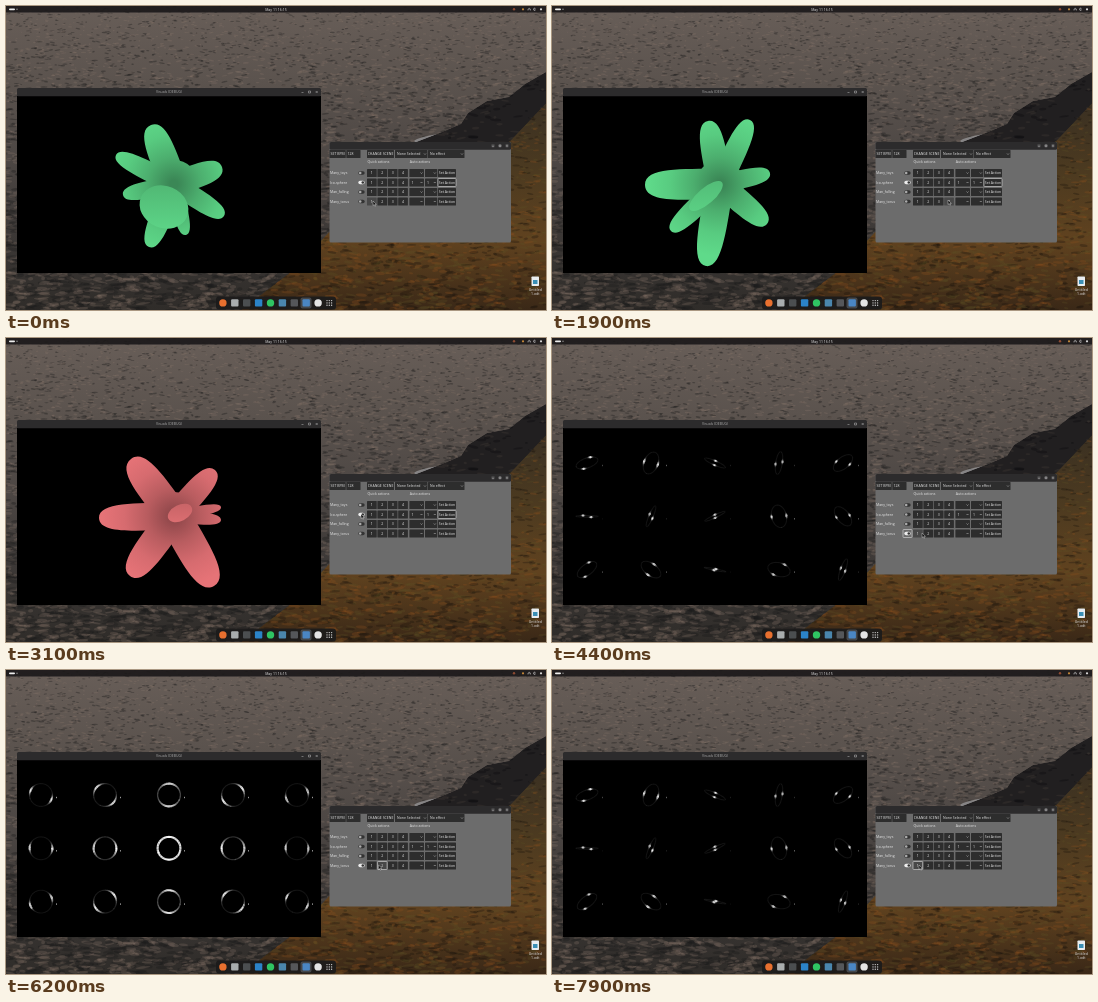
An HTML page with a canvas that plays this animation: 540x304 px, repeating every 8000 ms.

```html
<!DOCTYPE html>
<html lang="en">
<head>
<meta charset="utf-8">
<title>Desktop visuals</title>
<style>
html, body { margin: 0; width: 100%; height: 100%; overflow: hidden; background: #000; }
canvas, svg { position: absolute; left: 0; top: 0; }
#view { left: 11px; top: 90px; }
text { font-family: "Open Sans", "Noto Sans", sans-serif; font-size: 3.5px; fill: #e8e8e8; }
</style>
</head>
<body>
<canvas id="wall" width="540" height="304"></canvas>
<canvas id="view" width="304" height="177"></canvas>
<svg id="ui" width="540" height="304" viewBox="0 0 540 304"></svg>
<script>
const wall = document.getElementById('wall').getContext('2d');
const view = document.getElementById('view').getContext('2d');
const ui = document.getElementById('ui');
const TAU = Math.PI * 2;
const mix = (a, b, k) => a + (b - a) * k;
const smooth = v => { v = Math.max(0, Math.min(1, v)); return v * v * (3 - 2 * v); };
let seed = 7;
const rnd = (lo = 0, hi = 1) => lo + (hi - lo) * ((seed = seed * 16807 % 2147483647) / 2147483647);

// ---- Wallpaper: sea, cliff and heath in soft tones ----
function fade(y0, y1, ...stops) {
  const g = wall.createLinearGradient(0, y0, 0, y1);
  stops.forEach((c, i) => g.addColorStop(i / (stops.length - 1), c));
  return g;
}
function outline(pts) {
  const p = new Path2D();
  pts.forEach(q => p.lineTo(...q));
  p.closePath();
  return p;
}
function speck(x, y, rx, ry, turn, fill) {
  wall.fillStyle = fill;
  wall.beginPath();
  wall.ellipse(x, y, rx, ry, turn, 0, TAU);
  wall.fill();
}
// fills an outline, then scatters specks inside it
function textured(path, fill, count, top, size, tints) {
  wall.save();
  wall.clip(path);
  wall.fillStyle = fill;
  wall.fill(path);
  for (let i = 0; i < count; i++) {
    const y = rnd(top, 304), s = size * (0.5 + y / 250);
    speck(rnd(0, 540), y, s * rnd(0.8, 3), s * rnd(0.4, 0.8), rnd(-0.25, 0.25), tints[i % tints.length]);
  }
  wall.restore();
}
function paintWall() {
  const sea = outline([[0, 0], [540, 0], [540, 304], [0, 304]]);
  const cliff = outline([[540, 66], [519, 78], [503, 91], [481, 95], [462, 107], [455, 118], [436, 126], [405, 138], [540, 138]]);
  const heath = outline([[540, 97], [505, 134], [430, 190], [323, 226], [290, 262], [235, 304], [540, 304]]);
  textured(sea, fade(0, 304, '#685e58', '#5b534e', '#4d4744', '#3c3836', '#2f2c29'), 9000, 0, 1.5,
    ['rgba(28,27,29,.36)', 'rgba(146,126,112,.24)']);
  speck(424, 132, 16, 2.5, -0.2, 'rgba(170,172,175,.6)');
  textured(cliff, '#211f20', 1500, 60, 2, ['rgba(75,67,63,.25)', 'rgba(10,10,12,.35)']);
  textured(heath, fade(97, 304, '#3a3022', '#4c3a20', '#60421f', '#3a2817'), 4500, 95, 1.3,
    ['rgba(142,80,30,.28)', 'rgba(24,19,13,.3)', 'rgba(92,80,38,.25)']);
}

// ---- Interface ----
function add(tag, attrs, text) {
  const e = document.createElementNS('http://www.w3.org/2000/svg', tag);
  set(e, attrs);
  if (text) e.textContent = text;
  ui.append(e);
  return e;
}
function set(e, attrs) { for (const k in attrs) e.setAttribute(k, attrs[k]); }
const box = (x, y, width, height, fill, rx = 0) => add('rect', { x, y, width, height, fill, rx });
const dot = (cx, cy, r, fill) => add('circle', { cx, cy, r, fill });
const label = (x, y, s, anchor = 'start') => add('text', { x, y: y + 1.25, 'text-anchor': anchor }, s);
const stroke = (d, color) => add('path', { d, stroke: color, 'stroke-width': 0.5, fill: 'none' });
const DARK = '#2d2d2d', HOVER = '#484848';
const rowY = r => 167 + r * 9.5;
const buttonX = i => 361 + i * 10.4;
const toggles = [], torusButtons = [];
let focus, cursor;

function button(x, y, w, s) {
  const b = box(x, y - 4, w, 8, DARK, 0.6);
  if (s) label(x + w / 2, y, s, 'middle');
  return b;
}
function dropdown(x, y, w, s) {
  button(x, y, w);
  if (s) label(x + 2, y, s);
  stroke(`M${x + w - 3.5} ${y - 0.5}l1 1 1-1`, '#ccc');
}

function topBar() {
  box(0, 0, 540, 6.5, 'rgba(24,22,23,.88)');
  box(3, 2.4, 6, 1.8, '#eee', 0.9);
  dot(11, 3.3, 0.7, '#999');
  label(270, 3.3, 'May 11  16:15', 'middle');
  dot(508, 3.3, 1.2, '#8d4a32');
  dot(517, 3.3, 1.1, '#c88a3a');
  stroke('M522 4.5v-1.5h2.4v1.5M523.2 3v-1.2M527.5 2.7l1.5-.8v2.8l-1.5-.8z', '#ddd');
  dot(535, 3.3, 1.1, '#ddd');
}

function visualsWindow() {
  box(11, 82, 304, 8.2, '#2c2b2c', 1.5);
  label(163, 86, 'Visuals (DEBUG)', 'middle').style.fill = '#aaa';
  stroke('M295.5 86.5h2M302.5 85h2v2h-2zM309.7 85l2 2m0-2l-2 2', '#bbb');
}

function controlWindow() {
  box(323.5, 136, 181.5, 100.5, '#6c6c6c', 1.5);
  box(323.5, 136, 181.5, 7.8, '#2c2b2c', 1.5);
  for (let i = 0; i < 3; i++) dot(487 + i * 7, 139.8, 2, '#454445');
  stroke('M486 140.2h2M493.2 139h1.6v1.6h-1.6zM500.2 139l1.6 1.6m0-1.6l-1.6 1.6', '#ccc');
  button(323.5, 148, 16.3, 'SET BPM');
  button(340.3, 148, 14.2);
  label(341.5, 148, '128');
  button(361, 148, 27, 'CHANGE SCENE');
  dropdown(389, 148, 32.5, 'None Selected');
  dropdown(422, 148, 36.5, 'No effect');
  label(372.5, 156, 'Quick actions', 'middle');
  label(414, 156, 'Auto actions', 'middle');
  ['Many_toys', 'Ico-sphere', 'Man_falling', 'Many_torus'].forEach((name, r) => {
    const y = rowY(r), value = name === 'Ico-sphere' ? '1' : '';
    label(324, y, name);
    toggles.push([box(352.3, y - 1.8, 6.4, 3.6, '', 1.8), dot(0, y, 1.3)]);
    const quick = [0, 1, 2, 3].map(i => button(buttonX(i), y, 9.7, String(i + 1)));
    if (name === 'Many_torus') torusButtons.push(...quick);
    dropdown(403.4, y, 14.6, value);
    dropdown(419, y, 12.3, value);
    button(432, y, 18, 'Set Action');
  });
  focus = add('rect', { fill: 'none', stroke: '#ddd', 'stroke-width': 0.6, rx: 0.8, height: 8 });
}

function dock() {
  box(210, 290.5, 120, 13, 'rgba(28,27,27,.94)', 3);
  box(294.5, 291.5, 11, 11, '#45474a', 2);
  ['#e8702f', '#a9adae', '#4b4e50', '#2b83c8', '#2fc463', '#4a86ad', '#55575a', '#4a86c4', '#e4e4e4'].forEach((fill, i) =>
    box(213.2 + i * 11.9, 293.2, 7.4, 7.4, fill, i % 4 ? 1 : 3.7));
  for (let i = 0; i < 9; i++) dot(321 + i % 3 * 2.3, 294.6 + Math.floor(i / 3) * 2.3, 0.7, '#ccc');
}

function buildUi() {
  topBar();
  visualsWindow();
  controlWindow();
  dock();
  box(525.5, 270.5, 7.5, 9.5, '#e9edf0', 0.7);
  box(527, 274, 4.5, 4, '#3b8fb5');
  label(529.3, 284, 'Untitled', 'middle');
  label(529.3, 288, '1.odt', 'middle');
  cursor = add('path', { d: 'M0 0v4.6l1.1-1 .8 1.7.8-.4-.8-1.6h1.5z', fill: '#111', stroke: '#eee', 'stroke-width': 0.4 });
}

// interface events, in ms
const ICO_OFF = 3300, TORUS_ON = 3700, ALIGN = 5600, SCATTER = 7200;
// cursor stops: time, x, y
const stops = [[0, 367, 195], [900, 376, 195], [1900, 396, 194], [3000, 355, 176], [ICO_OFF, 355, 176],
  [TORUS_ON, 355, 195], [4300, 370, 195], [ALIGN, 372.5, 195], [6900, 372.5, 195], [SCATTER, 367, 195], [8000, 367, 195]];

function updateUi(t) {
  const i = stops.findIndex(s => s[0] > t), [t0, x0, y0] = stops[i - 1], [t1, x1, y1] = stops[i];
  const k = smooth((t - t0) / (t1 - t0)), x = mix(x0, x1, k), y = mix(y0, y1, k);
  set(cursor, { transform: `translate(${x} ${y})` });
  torusButtons.forEach((b, n) =>
    set(b, { fill: y > 191 && x >= buttonX(n) && x < buttonX(n + 1) ? HOVER : DARK }));
  toggles.forEach(([pill, knob], r) => {
    const on = r === 1 && t < ICO_OFF || r === 3 && t >= TORUS_ON;
    set(pill, { fill: on ? '#eee' : '#333' });
    set(knob, { cx: on ? 356.8 : 354.2, fill: on ? '#333' : '#aaa' });
  });
  const [fx, row, width] = t < ICO_OFF ? [432, 1, 18] : t < TORUS_ON ? [351, 1, 9]
    : t < ALIGN ? [351, 3, 9] : [buttonX(t < SCATTER ? 1 : 0), 3, 9.7];
  set(focus, { x: fx, y: rowY(row) - 4, width });
}

// ---- Blob: lobe tips clockwise from the top, and an oval lobe facing the viewer ----
const CX = 168, CY = 178;
const poses = [
  { t: 0, front: [158, 201, 21, 25], tips: [[145, 119], [216, 161], [218, 210], [180, 229], [143, 241], [117, 189], [110, 149]] },
  { t: 900, front: [167, 199, 20, 15], tips: [[172, 98], [203, 144], [226, 180], [202, 233], [167, 248], [106, 229], [94, 139]] },
  { t: 1900, front: [154, 190, 21, 8], tips: [[156, 115], [198, 114], [218, 167], [215, 218], [154, 260], [119, 225], [93, 179]] },
  { t: 3100, front: [174, 175, 13, 8], tips: [[125, 121], [209, 132], [215, 169], [215, 182], [208, 248], [124, 238], [93, 180]] }
];
const blend = (a, b, k) => Array.isArray(a) ? a.map((v, i) => blend(v, b[i], k)) : mix(a, b, k);
const GREEN = [95, 218, 138], BLUE = [114, 150, 226], RED = [230, 115, 119];
const hues = [GREEN, BLUE, BLUE, GREEN, GREEN, RED, RED, RED];
const BEAT = 60000 / 128;
const tone = (c, k) => `rgb(${c.map(v => Math.round(v * k))})`;

function drawLobe(dx, dy, w) {
  const at = (along, side) => [CX + dx * along - dy * side * w, CY + dy * along + dx * side * w];
  view.beginPath();
  view.moveTo(...at(0, 0.6));
  view.bezierCurveTo(...at(0.5, 0.6), ...at(1, 0.72), ...at(1, 0));
  view.bezierCurveTo(...at(1, -0.72), ...at(0.5, -0.6), ...at(0, -0.6));
  view.fill();
}

function drawBlob(t) {
  const i = poses.findLastIndex(p => p.t <= t), a = poses[i], b = poses[i + 1] || a;
  const k = smooth((t - a.t) / (b.t - a.t || 1));
  const color = hues[Math.floor(t / BEAT)];
  const g = view.createRadialGradient(CX, CY, 4, CX, CY, 72);
  [0.62, 0.8, 0.93, 1].forEach((v, n) => g.addColorStop(n / 3, tone(color, v)));
  view.fillStyle = g;

  const arms = blend(a.tips, b.tips, k).map(([x, y]) => [x - CX, y - CY]);
  arms.forEach(([dx, dy], n) => {
    // lobes swell into the free space between their neighbours
    const [px, py] = arms.at(n - 1), [qx, qy] = arms[(n + 1) % arms.length];
    const gap = (Math.atan2(qy, qx) - Math.atan2(py, px) + TAU) % TAU;
    drawLobe(dx, dy, 0.06 + 0.13 * gap);
  });
  view.beginPath();
  view.arc(CX, CY, 24, 0, TAU);
  view.fill();

  const [x, y, long, short] = blend(a.front, b.front, k);
  const shade = view.createLinearGradient(0, y - long, 0, y + long);
  shade.addColorStop(0, tone(color, 0.85));
  shade.addColorStop(1, tone(color, 0.97));
  view.fillStyle = shade;
  view.beginPath();
  view.ellipse(x, y, long, short, Math.atan2(y - CY, x - CX), 0, TAU);
  view.fill();
}

// ---- Rings: a 5 by 3 grid, each with its own axis and tilt ----
const rings = [];
function buildRings() {
  for (let n = 0; n < 15; n++) rings.push({
    cx: 35 + n % 5 * 64, cy: 125 + Math.floor(n / 5) * 53.3,
    axis: rnd(0, Math.PI), tilt: rnd(0.8, 1.5), spin: rnd(-1, 1)
  });
}

function drawRing({ cx, cy, axis, tilt, spin }, t) {
  const tumble = tilt + spin * (Math.min(t, ALIGN) - 4400) / 1000;
  const angle = t < SCATTER ? tumble * (1 - smooth((t - ALIGN) / 500)) : tilt * smooth((t - SCATTER + 100) / 700);
  const ct = Math.cos(angle), st = Math.sin(angle), ca = Math.cos(axis), sa = Math.sin(axis);
  const turn = (x, y) => [x * ca - y * ct * sa, x * sa + y * ct * ca, y * st];
  const point = q => {
    const [x, y] = turn(11.4 * Math.cos(q), 11.4 * Math.sin(q));
    return [cx + x, cy + y];
  };
  // light sits at the eye: the tube shines where it runs across the line of sight
  const hx = (163 - cx) / 300, hy = (178.3 - cy) / 300, len = Math.hypot(hx, hy, 1);
  const step = TAU / 72;
  for (let q = 0; q < TAU; q += step) {
    const [x, y, z] = turn(-Math.sin(q), Math.cos(q));
    const shine = (1 - ((x * hx + y * hy + z) / len) ** 2) ** 50;
    view.strokeStyle = `rgba(255,255,255,${0.08 + 0.92 * shine})`;
    view.lineWidth = 1.1 + shine;
    view.beginPath();
    view.moveTo(...point(q));
    view.lineTo(...point(q + step));
    view.stroke();
  }
  view.fillStyle = `rgba(255,255,255,${0.6 * Math.abs(ct)})`;
  view.fillRect(cx + 15, cy + 1.8, 1, 1.4);
}

function draw(now) {
  let t = Math.floor(now % 8000 / 100) * 100;
  if (t > 6900 && t < SCATTER) t = 6900;
  view.setTransform(1, 0, 0, 1, 0, 0);
  view.fillStyle = '#000';
  view.fillRect(0, 0, 304, 177);
  view.translate(-11, -90);
  if (t < ICO_OFF) drawBlob(t);
  if (t >= TORUS_ON) rings.forEach(r => drawRing(r, t));
  updateUi(t);
}

paintWall();
buildUi();
buildRings();
const start = performance.now();
function loop() {
  draw(performance.now() - start);
  requestAnimationFrame(loop);
}
loop();
</script>
</body>
</html>
```
